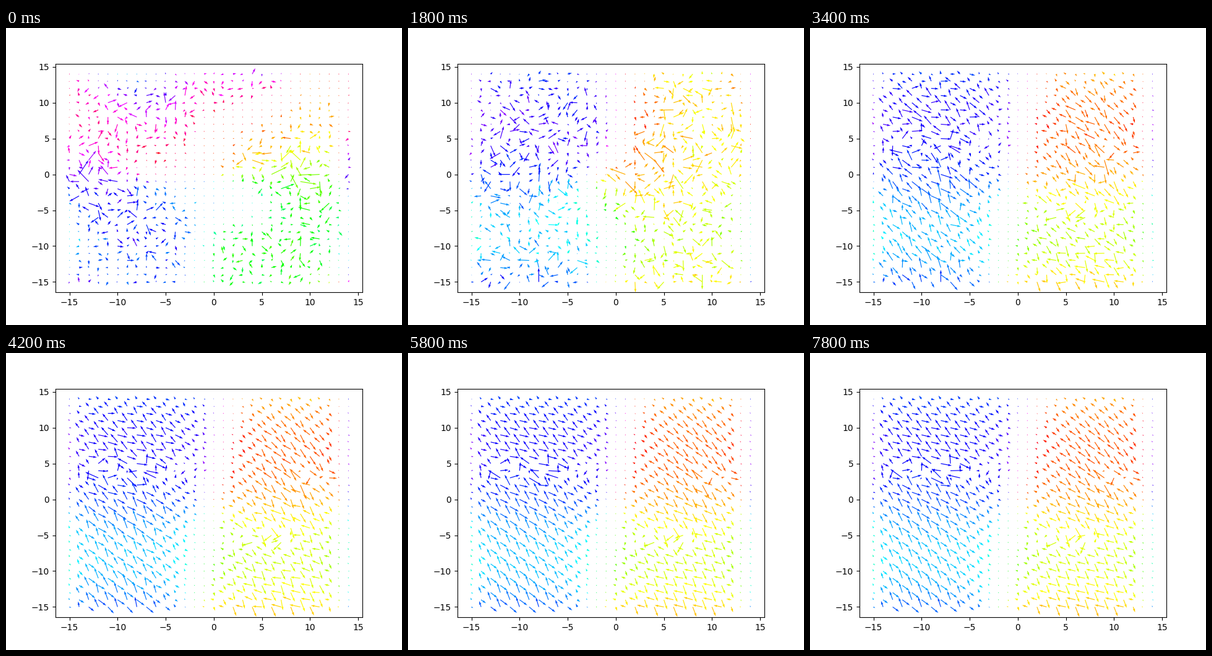
These frames come from a looping animation (640x480 px, 8000 ms). A matplotlib script:

```python
import numpy as np
import matplotlib.pyplot as plt
from matplotlib.animation import FuncAnimation
from matplotlib.colors import hsv_to_rgb

FRAMES, STEP = 40, 200
TAU = 2 * np.pi
rng = np.random.default_rng(11)
axis = np.arange(-15, 15)
X, Y = np.meshgrid(axis, axis)

# Passing colour patches: peak time in seconds, x, y, hue
PATCHES = ((0, 0, 5, 0.03), (0, -7, -12, 0.58), (0, 4, 13, 0.85),
           (1, 8, 8, 0.03), (1, -4, -11, 0.57), (1.8, 9, 6, 0.26),
           (1.8, 2, -3, 0.11), (1.8, -4, -7, 0.47))


def phase(hue):
    return np.exp(1j * TAU * hue)


def unit(deg):
    return np.exp(1j * np.radians(deg))


def main_hue(t):
    return 0.63 + 0.12 * np.exp(-t / 0.7) - 0.002 * t


def field(t):
    """Two opposite domains, walls near x = 0 and x = 14, plus ripples."""
    fresh = np.exp(-t / 1.3)
    mid = 0.12 * Y - 0.3
    re = (np.tanh((mid - X) / 3.8) - np.tanh((13.5 - X) / 2)
          + np.tanh((X + 15.7) / 2))
    re = re * np.tanh((16 - Y) / 3.5)
    im = (np.where(Y > 0, 0.36, 0.5) + 0.35 * fresh) * np.sin(
        TAU * (Y + 0.6) / 30)
    ripple = sum(phase((kx * X + ky * Y) / 30 + start + drift * t)
                 for kx, ky, start, drift in waves)
    z = (re + 1j * im + 0.2 * fresh * ripple) * phase(main_hue(t))
    for peak, x, y, hue in PATCHES:
        d2 = (X - x) ** 2 + (Y - y) ** 2
        z = z + 1.5 * phase(hue) * np.exp(-d2 / 24 - ((t - peak) / 0.6) ** 2)
    return z / np.maximum(1, np.abs(z))


waves = [(*rng.integers(-2, 3, 2), *rng.uniform(-0.5, 0.5, 2))
         for _ in range(4)]
spin0 = rng.uniform(0, TAU, X.shape)
swing = rng.normal(0, 2.5, X.shape)
reach = 0.35 + 0.95 * rng.random(X.shape) ** 1.7
jitter = rng.normal(0, 1, X.shape)

# Ordered state: two alternating directions, swapped across a seam.
seam = np.where(X < 0, 3.7, np.where(X < 9, -5.5, 3.5))
even = (X + Y + (Y > seam)) % 2 == 0
ordered = np.where(even, 0.9 * unit(-25 - 12 * np.tanh(X * Y / 40)),
                   unit(118 + 8 * np.tanh(Y / 8)))
seam_noise = 0.75 * np.exp(-((Y - seam) / 1.4) ** 2)


def state(t):
    order = 0.96 / (1 + np.exp(-1.4 * (t - 2.7)))
    z = field(t)
    along = (z / phase(main_hue(t))).real
    size = np.sign(along) * np.abs(along) ** 1.4
    size = size * (18 + 4 * np.exp(-t))
    size = size * (1 - 0.5 * np.exp(-t / 0.8) * (Y / 15) ** 2)
    hue = np.angle(z) / TAU + jitter * (0.02 * (1 - order) + 0.004)

    k = order * (1 - seam_noise)
    loose = reach * np.exp(1j * (spin0 + swing * (1 - np.exp(-t / 2))))
    arrow = size * ((1 - k) * loose + k * ordered) / np.hypot(k, 1 - k)

    hsv = np.ones((X.size, 3))
    hsv[:, 0] = hue.ravel() % 1
    return arrow.real, arrow.imag, hsv_to_rgb(hsv)


fig, ax = plt.subplots(figsize=(6.4, 4.8), dpi=100)
u0, v0, rgb0 = state(0)
arrows = ax.quiver(X, Y, u0, v0, color=rgb0, scale=1, scale_units="dots",
                   width=0.0024)
ax.set(xlim=(-16.45, 15.45), ylim=(-16.45, 15.45),
       xticks=range(-15, 16, 5), yticks=range(-15, 16, 5))


def draw(n):
    u, v, rgb = state(n * STEP / 1000)
    arrows.set_UVC(u, v)
    arrows.set_facecolor(rgb)
    return (arrows,)


anim = FuncAnimation(fig, draw, frames=FRAMES, interval=STEP, repeat=True,
                     repeat_delay=0, init_func=lambda: draw(0))
plt.show()
```
